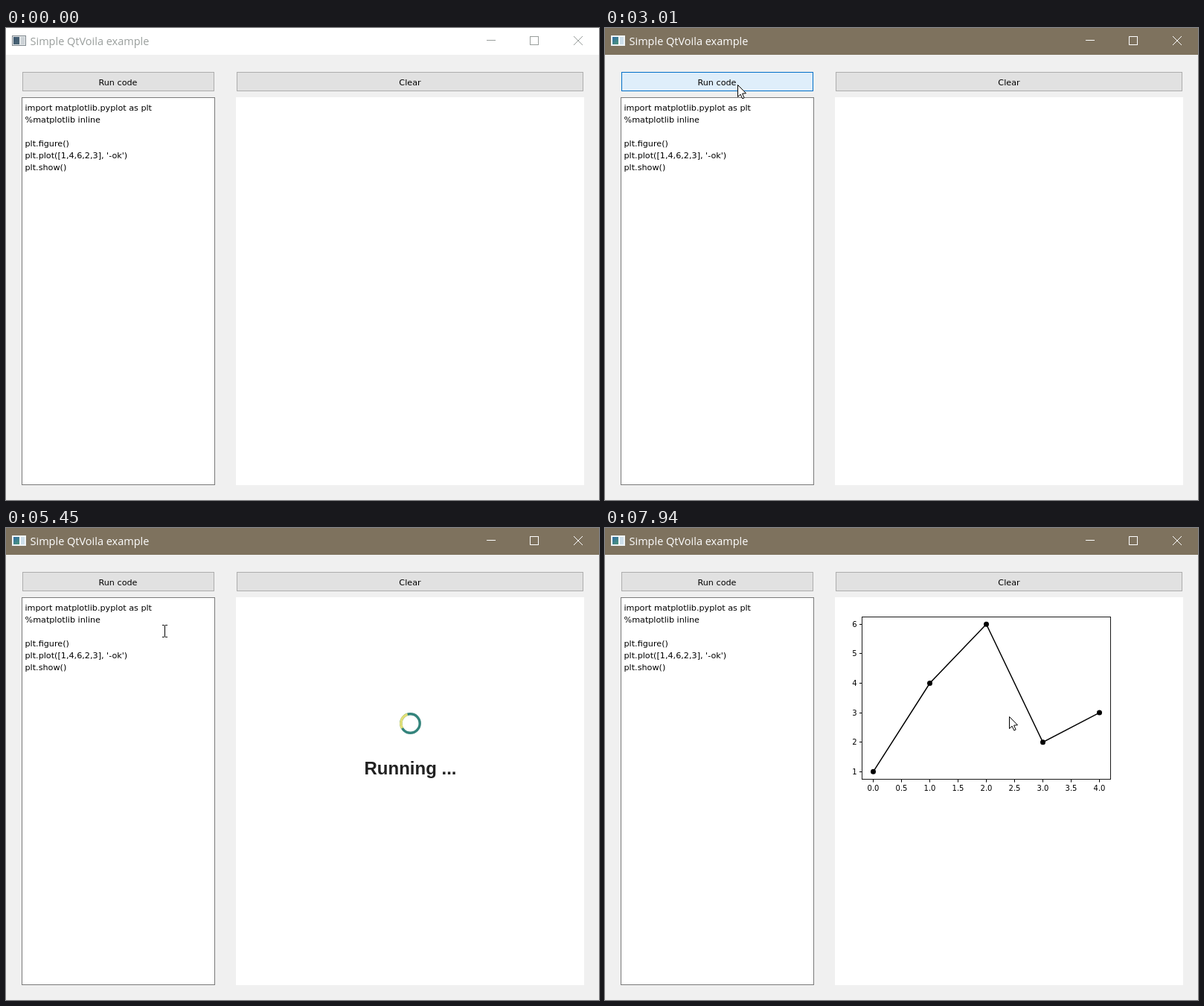
Recreate the animation shown at these times as an HTML page with a canvas. Size 797 by 634 pixels, loop 8 s.

```html
<!DOCTYPE html>
<html lang="en">
<head>
<meta charset="utf-8">
<title>Simple QtVoila example</title>
<style>
  html, body { margin: 0; width: 100%; height: 100%; overflow: hidden; background: #f0f0f0; }
  canvas { display: block; }
</style>
</head>
<body>
<canvas id="stage" width="797" height="634"></canvas>
<script>
const ctx = document.getElementById('stage').getContext('2d');
const LOOP = 8000;
const STEP = 65; // usual time between screen updates
const SPIN_START = 5190, PLOT_START = 7200;

const UI_FONT = '11.2px "DejaVu Sans", sans-serif';
const TICK_FONT = '10px "DejaVu Sans", sans-serif';
const TITLE_FONT = '14.5px "Open Sans", sans-serif';
const HEAD_FONT = 'bold 24px "Liberation Sans", Arial, sans-serif';
const CODE = [
  'import matplotlib.pyplot as plt', '%matplotlib inline', '',
  'plt.figure()', "plt.plot([1,4,6,2,3], '-ok')", 'plt.show()'
];

const smooth = p => p * p * (3 - 2 * p);
const easeIn = p => p ** 3;
const easeOut = p => 1 - (1 - p) ** 3;

// Pointer journey: each leg starts where the one before ended
const ENTRY = [365, 559];
const LEGS = [
  { from: 530, to: 1380, end: [178, 76], ease: easeOut },
  { from: 3310, to: 3900, end: [192.5, 102], ease: smooth },
  { from: 4080, to: 4860, end: [202.5, 126], ease: smooth },
  { from: 4930, to: 5710, end: [217.5, 142], ease: smooth },
  { from: 5780, to: 6560, end: [452, 311], ease: easeOut },
  { from: 6630, to: 7330, end: [452, 376], ease: easeIn },
  { from: 7890, to: 7940, end: [543, 253], ease: smooth }
];

const clamp = v => Math.max(0, Math.min(1, v));
const fade = (t, from, to) => clamp((t - from) / (to - from));
const blend = (a, b, k) => a.map((v, i) => v + (b[i] - v) * k);
const rgb = c => `rgb(${c.map(Math.round).join()})`;
const mix = (a, b, k) => rgb(blend(a, b, k));

// Progress of a leg, advancing in whole screen updates
function progress({ from, to }, t) {
  const steps = Math.round((to - from) / STEP);
  return clamp(Math.floor(fade(t, from, to) * steps + 0.05) / steps);
}

function rect(x, y, w, h, fill) {
  ctx.fillStyle = fill;
  ctx.fillRect(x, y, w, h);
}

function framed(x, y, w, h, fill, border) {
  rect(x, y, w, h, border);
  rect(x + 1, y + 1, w - 2, h - 2, fill);
}

function line(points, color, width = 1) {
  ctx.beginPath();
  points.forEach(([x, y]) => ctx.lineTo(x, y));
  ctx.strokeStyle = color;
  ctx.lineWidth = width;
  ctx.stroke();
}

function arc(x, y, r, from, to, color, width) {
  ctx.beginPath();
  ctx.arc(x, y, r, from, to);
  ctx.strokeStyle = color;
  ctx.lineWidth = width;
  ctx.stroke();
}

function text(s, x, y, font, color = '#000', align = 'left') {
  ctx.font = font;
  ctx.fillStyle = color;
  ctx.textAlign = align;
  ctx.fillText(s, x, y);
}

function titleBar(t) {
  const k = Math.floor(fade(t, 1630, 1810) * 3 + 0.01) / 3;
  const ink = mix([153, 158, 156], [255, 255, 255], k);
  rect(0, 0, 797, 36, mix([255, 255, 255], [126, 114, 94], k));

  framed(8, 10, 19, 14, mix([226, 230, 232], [244, 248, 250], k),
    mix([130, 138, 144], [235, 240, 242], k));
  const pane = ctx.createLinearGradient(10, 12, 18, 22);
  pane.addColorStop(0, mix([62, 88, 112], [48, 108, 165], k));
  pane.addColorStop(1, mix([74, 100, 116], [78, 150, 120], k));
  rect(10, 12, 8, 10, pane);
  rect(20, 12, 5, 10, mix([205, 211, 215], [205, 222, 234], k));

  text('Simple QtVoila example', 32.5, 23, TITLE_FONT, ink);
  line([[646, 16.5], [658, 16.5]], ink);
  ctx.strokeRect(704.5, 11.5, 11, 11);
  line([[763, 11], [775, 23]], ink);
  line([[763, 23], [775, 11]], ink);
}

function runButton(t) {
  const hover = fade(t, 1050, 1310) - fade(t, 3520, 3900);
  const release = t < 3010 ? 0 : t < 3310 ? 0.75 : 1;
  const press = fade(t, 1630, 1810) * (t >= 1690) * (1 - release);
  const shade = (idle, hot, down) => rgb(blend(blend(idle, hot, hover), down, press));
  framed(22, 59, 258, 26,
    shade([225, 225, 225], [229, 241, 251], [204, 228, 247]),
    shade([173, 173, 173], [0, 120, 215], [0, 84, 153]));
  text('Run code', 150.5, 77, UI_FONT, '#000', 'center');
}

function spinner(t) {
  const mid = -0.91 + (t - 6105) / 2200 * Math.PI * 2;
  arc(543.5, 262.5, 12.7, 0, Math.PI * 2, '#34847c', 3.4);
  arc(543.5, 262.5, 12.7, mid - 0.9, mid + 0.9, '#e3e078', 3.4);
  text('Running ...', 543.5, 331, HEAD_FONT, '#212121', 'center');
}

function plot() {
  const px = v => 360.5 + v * 76;
  const py = v => 327.3 - (v - 1) * 39.6;
  for (let v = 0; v <= 4; v += 0.5) {
    const x = Math.floor(px(v)) + 0.5;
    line([[x, 338], [x, 341.5]], '#000');
    text(v.toFixed(1), px(v), 353, TICK_FONT, '#000', 'center');
  }
  for (let v = 1; v <= 6; v++) {
    const y = Math.floor(py(v)) + 0.5;
    line([[342, y], [345, y]], '#000');
    text(v, 338.5, y + 3.5, TICK_FONT, '#000', 'right');
  }
  const points = [1, 4, 6, 2, 3].map((v, i) => [px(i), py(v)]);
  line(points, '#000', 1.5);
  for (const [x, y] of points) {
    ctx.beginPath();
    ctx.arc(x, y, 3.5, 0, Math.PI * 2);
    ctx.fillStyle = '#000';
    ctx.fill();
  }
  ctx.strokeStyle = '#1a1a1a';
  ctx.lineWidth = 1;
  ctx.strokeRect(345.5, 119.5, 334, 218);
}

function beam(x, y) {
  x = Math.floor(x);
  y = Math.round(y);
  rect(x, y - 7, 1, 15, '#000');
  for (const edge of [y - 8, y + 8]) {
    rect(x - 3, edge, 3, 1, '#000');
    rect(x + 1, edge, 3, 1, '#000');
  }
}

function arrow(x, y) {
  ctx.save();
  ctx.translate(Math.round(x) + 0.5, Math.round(y) + 0.5);
  ctx.beginPath();
  [[0, 0], [0, 16], [3.6, 12.6], [6.3, 18.4], [8.6, 17.4], [6.1, 11.6], [11, 11.2]]
    .forEach(p => ctx.lineTo(...p));
  ctx.closePath();
  ctx.fillStyle = '#fff';
  ctx.fill();
  ctx.strokeStyle = '#000';
  ctx.lineWidth = 1;
  ctx.stroke();
  ctx.restore();
}

function pointer(t) {
  if (t < LEGS[0].from) return;
  const [x, y] = LEGS.reduce(
    (at, leg) => blend(at, leg.end, leg.ease(progress(leg, t))), ENTRY);
  const overCode = x > 21 && x < 281 && y > 93 && y < 614;
  (overCode ? beam : arrow)(x, y);
}

function draw(t) {
  rect(0, 0, 797, 634, '#f0f0f0');
  titleBar(t);
  runButton(t);
  framed(310, 59, 466, 26, '#e1e1e1', '#adadad');
  text('Clear', 543, 77, UI_FONT, '#000', 'center');

  framed(21, 93, 260, 521, '#fff', '#7a7a7a');
  CODE.forEach((s, i) => text(s, 25.5, 111 + i * 16, UI_FONT));

  rect(309, 93, 468, 521, '#fff');
  if (t >= PLOT_START) plot();
  else if (t >= SPIN_START) spinner(t);
  pointer(t);
}

const start = performance.now();
function tick() {
  draw((performance.now() - start) % LOOP);
  requestAnimationFrame(tick);
}
tick();
</script>
</body>
</html>
```
